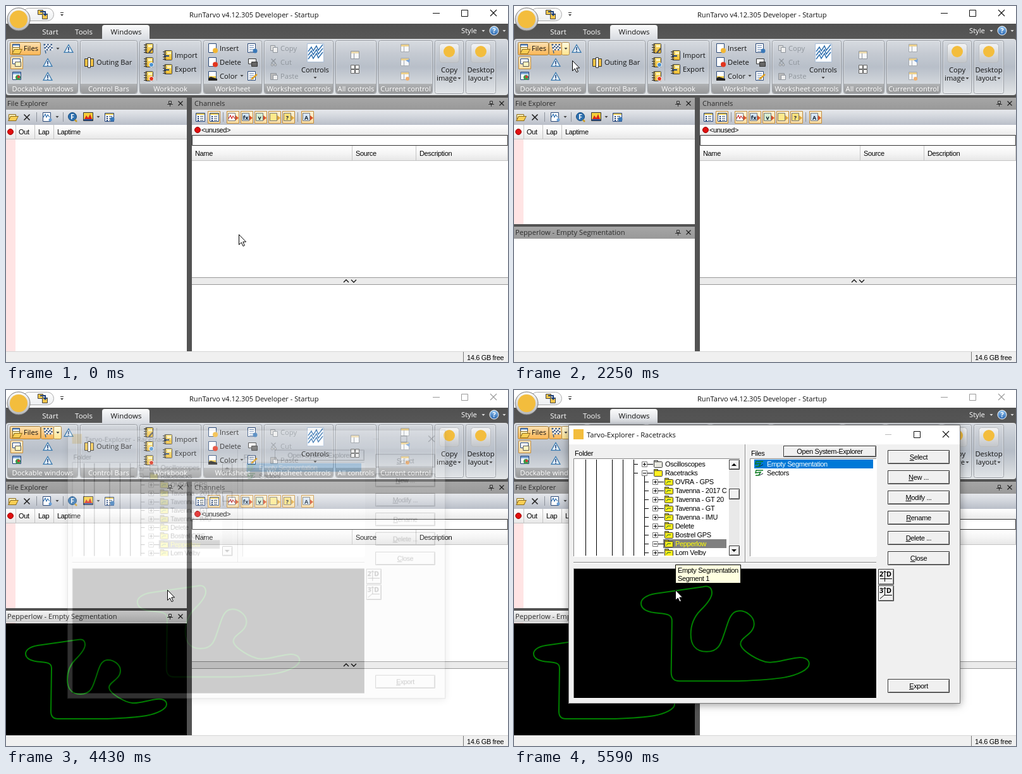
An HTML page with a canvas for the animation above (5670 ms loop, 794 px wide and 563 px high).

```html
<!DOCTYPE html>
<html lang="en">
<head>
<meta charset="utf-8">
<title>Racetrack pane</title>
<style>
html, body { margin: 0; width: 100%; height: 100%; overflow: hidden; background: #fff }
canvas { display: block }
</style>
</head>
<body>
<canvas id="stage" width="794" height="563"></canvas>
<script>
const W = 794, H = 563, LOOP = 5670, STEP = 77.67;
const stage = document.getElementById('stage');
const layer = new OffscreenCanvas(W, H).getContext('2d');
let c = stage.getContext('2d');

const UI = '11.2px "Open Sans", "Noto Sans", sans-serif';
const BOLD = 'bold 10.8px "Open Sans", "Noto Sans", sans-serif';
const SYS = '11px "Liberation Sans", Arial, sans-serif';
const DARK = '#535353', ORANGE = ['#fde3b5', '#fbb450'], YELLOW = ['#fffbe4', '#ffe38c'];
const FACE = '#f0f0f0', NAVY = '#1d3f78', BALL = '#f3bd3d';
const TRACK = new Path2D('M82 520H160C185 519 205 518 222 515C238 512 254 505 254 497C254 490 246 488 238 489' +
  'C222 491 212 496 200 495C188 494 164 480 163 471C162 462 181 458 181 444C181 434 170 426 160 427' +
  'C148 428 146 445 141 458C137 470 134 481 118 481C102 481 97 470 97 458C97 444 102 434 110 426' +
  'C118 418 125 410 125 403C125 396 121 393 113 395L50 404C38 406 31 411 31 417C31 425 40 429 55 430' +
  'C66 431 72 432 72 440L71 508C71 516 74 520 82 520Z');
const ARROW = new Path2D('M.5 .5V16.5L4.3 13L7 18.8L9.4 17.7L6.8 12H11.6Z');

// ---- primitives ----
function paint(fill, y, h) {
  if (!Array.isArray(fill)) return fill;
  const g = c.createLinearGradient(0, y, 0, y + h);
  fill.forEach((col, i) => g.addColorStop(i / (fill.length - 1), col));
  return g;
}
function rect(x, y, w, h, fill, stroke, r = 0) {
  const o = stroke ? .5 : 0;
  c.beginPath();
  c.roundRect(x + o, y + o, w - 2 * o, h - 2 * o, r);
  if (fill) { c.fillStyle = paint(fill, y, h); c.fill(); }
  if (stroke) { c.lineWidth = 1; c.strokeStyle = stroke; c.stroke(); }
}
function line(col, width, ...p) {
  c.beginPath();
  for (let i = 0; i < p.length; i += 2) c.lineTo(p[i], p[i + 1]);
  c.strokeStyle = col; c.lineWidth = width; c.stroke();
}
function poly(col, ...p) {
  c.beginPath();
  for (let i = 0; i < p.length; i += 2) c.lineTo(p[i], p[i + 1]);
  c.closePath(); c.fillStyle = col; c.fill();
}
function dot(x, y, r, fill, stroke) {
  c.beginPath(); c.arc(x, y, r, 0, 7);
  c.fillStyle = paint(fill, y - r, 2 * r); c.fill();
  if (stroke) { c.strokeStyle = stroke; c.lineWidth = 1; c.stroke(); }
}
function text(s, x, y, col = '#111', font = UI, align = 'left') {
  c.font = font; c.fillStyle = col; c.textAlign = align;
  c.letterSpacing = font === SYS ? '-0.35px' : '0px';
  c.fillText(s, x, y);
}
const sys = (s, x, y, col = '#000', align) => text(s, x, y, col, SYS, align);
const drop = (x, y, col = '#444') => poly(col, x - 2.5, y - 1, x + 2.5, y - 1, x, y + 2);
const cross = (x, y, r, col = '#222', w = 1.2) => {
  line(col, w, x - r, y - r, x + r, y + r);
  line(col, w, x + r, y - r, x - r, y + r);
};
function fade(alpha, draw, scale = 1) {
  const main = c;
  c = layer; c.clearRect(0, 0, W, H); draw(); c = main;
  c.save();
  c.globalAlpha = alpha;
  c.translate(396, 275); c.scale(scale, scale);
  c.drawImage(layer.canvas, -396, -275);
  c.restore();
}
function track(s = 1, dx = 0, dy = 0) {
  c.save(); c.translate(dx, dy); c.scale(s, s);
  c.strokeStyle = '#008000'; c.lineWidth = 2 / s; c.stroke(TRACK);
  c.restore();
}

// ---- icons, placed by centre ----
function flag(x, y) {
  line('#33608f', 1.3, x - 6, y - 7, x - 3, y + 8);
  for (let i = 0; i < 5; i++) for (let j = 0; j < 4; j++)
    rect(x - 6 + i * 2.6 + j * .4, y - 7 + j * 2.5 + (i % 2) * .4, 2.6, 2.5, (i + j) % 2 ? '#fff' : '#3f5f8c');
}
function warn(x, y) {
  poly('#3878ae', x, y - 7, x + 8, y + 7, x - 8, y + 7);
  poly('#e4f0f8', x, y - 4.5, x + 5.8, y + 5.8, x - 5.8, y + 5.8);
  rect(x - .8, y - 2, 1.6, 5, NAVY); rect(x - .8, y + 4, 1.6, 1.4, NAVY);
}
function book(x, y, badge) {
  rect(x - 6, y - 8, 13, 16, ['#ffe57a', '#f0b92c'], '#3c3c3c', 1);
  line('#3c3c3c', 1, x - 3.5, y - 8, x - 3.5, y + 8);
  rect(x - 1, y - 5, 6, 3, '#fff4c4');
  for (let i = -6; i < 8; i += 4) rect(x - 8, y + i, 4, 1, '#333');
  if (badge) dot(x + 4, y + 4, 3.5, badge, '#fff');
}
function page(x, y, badge, lines) {
  rect(x - 7, y - 8, 13, 15, '#fff', '#2c4a78');
  if (lines) for (let i = -5; i < 5; i += 3) rect(x - 4, y + i, 7, 1, '#6d8db8');
  if (badge) dot(x + 4, y + 3.5, 4, badge);
}
function win(x, y, col = NAVY, head = '#f5c64a') {
  rect(x - 7, y - 7, 14, 13, '#f6f8fb', col);
  rect(x - 6, y - 6, 12, 3, head);
  line(col, 1, x - 1.5, y - 3, x - 1.5, y + 6);
}
function folder(x, y, w = 15, fill = '#ffdf45') {
  rect(x - w / 2, y - 6, 7, 4, fill, '#333');
  rect(x - w / 2, y - 4, w, 10, fill, '#333', 1);
}
function openFolder(x, y) {
  rect(x - 7, y - 4, 12, 10, '#fff3b8', '#8a6a1c');
  poly('#8a6a1c', x - 4, y - 1, x + 9, y - 1, x + 5, y + 7, x - 8, y + 7);
  poly('#f9cf55', x - 3.3, y, x + 7.6, y, x + 4.3, y + 6, x - 6.5, y + 6);
}
function wave(x, y, col = '#2266aa') {
  line(col, 1.1, x - 5, y + 2, x - 2, y - 3, x, y + 2, x + 2, y - 2, x + 5, y + 2);
}
function pin(x, y, col = '#333') {
  rect(x - 2, y - 4, 5, 5, null, col);
  line(col, 1, x - 4, y + 1.5, x + 5, y + 1.5);
  line(col, 1, x + .5, y + 1.5, x + .5, y + 5);
}
function tree(x, y) {
  rect(x - 7, y - 7, 15, 14, '#fff', NAVY);
  rect(x - 6, y - 6, 13, 2, '#f5c64a');
  for (let i = 0; i < 3; i++) {
    rect(x - 4, y - 2 + i * 3, 2, 2, NAVY);
    rect(x, y - 2 + i * 3, 5, 1, '#456');
  }
}
const mark = (x, y) => rect(x - 10, y - 10, 20, 20, ['#fdf3d8', '#f8dca0'], '#c28b3a');

// ---- main window ----
function titleBar(inactive) {
  rect(0, 0, W, 28, '#fff');
  text('RunTarvo v4.12.305 Developer - Startup', 290, 18, '#111', '11.1px "Open Sans", "Noto Sans", sans-serif');
  const col = inactive ? '#9a9a9a' : '#111';
  line(col, 1, 675, 11.5, 686, 11.5);
  rect(720, 6, 11, 11, null, col);
  cross(771, 11, 5, col, 1.1);
  rect(26, 3, 50, 21, ['#fff', '#eceef0'], '#aaa', 10);
  rect(50, 6, 9, 8, '#f5c64a', '#444'); rect(57, 12, 9, 9, '#f5c64a', '#444');
  line(NAVY, 2, 54, 9, 62, 9, 62, 13); poly(NAVY, 58, 12, 66, 12, 62, 16);
  line('#333', 1, 86, 10.5, 91, 10.5); drop(88.5, 14);
}
function tabs(k) {
  rect(0, 28, W, 24, ['#505050', '#575757']);
  if (k >= 7 && k <= 9) rect(98, 30, 50, 22, ['#8c8c8c', '#666'], '#9a9a9a', 3);
  rect(152, 30, 75, 24, ['#fafbfb', '#e8eaed', '#d6dae0'], null, [4, 4, 0, 0]);
  const f = '11.5px "Open Sans", "Noto Sans", sans-serif';
  text('Start', 70, 45, '#fff', f, 'center');
  text('Tools', 123, 45, '#fff', f, 'center');
  text('Windows', 190, 45, '#111', f, 'center');
  text('Style', 720, 43, '#fff');
  drop(755, 39, '#ddd'); drop(788, 39, '#ddd');
  dot(772, 39, 7, ['#8fc3f0', '#2a66b0'], '#fff');
  text('?', 772, 43, '#fff', BOLD, 'center');
  dot(20, 21, 18, ['#fdfdfd', '#b4b7bb'], '#777');
  dot(20, 21, 14, BALL);
}
const GROUPS = [[2, 112, 'Dockable windows'], [117, 91, 'Control Bars'], [211, 98, 'Workbook'],
  [312, 93, 'Worksheet'], [408, 110, 'Worksheet controls'], [521, 65, 'All controls'],
  [589, 86, 'Current control'], [678, 46], [727, 48]];
function ribbon(k) {
  rect(0, 52, W, 93, DARK);
  rect(0, 52, W, 89, ['#d6dae0', '#c3c9d1', '#b6bdc7', '#cbd0d6', '#e2e5e7'], '#e6e8ea', 3);
  GROUPS.forEach(([x, w, name], i) => {
    const hot = !i && k >= 10 && k < 29;
    rect(x, 54, w, 85, hot ? ['#eef1f4', '#e6e9ed', '#e9ecef', '#f3f5f6', '#fafafa']
      : ['#d8dce1', '#c5cad2', '#b8bfc9', '#cdd2d8', '#e2e5e8'], '#9a9ea4', 3);
    rect(x + 1, 55, w - 2, 83, null, 'rgba(255,255,255,.35)', 2);
    if (!name) return;
    rect(x + 1, 123, w - 2, 15, hot ? ['#8d8d8d', '#757575'] : ['#b0b2b4', '#979899'], null, [0, 0, 3, 3]);
    text(name, x + w / 2, 135, '#fff', UI, 'center');
  });
  rect(6, 57, 49, 21, ORANGE, '#a67f3c', 2);
  rect(10, 60, 12, 8, '#fff', NAVY); rect(11, 61, 10, 2, '#7ea6d4'); openFolder(17, 69);
  text('Files', 28, 71);
  if (k >= 11) {
    const on = k >= 14;
    rect(55, 57, 21, 21, on ? ORANGE : YELLOW, '#b08a4a', 2);
    rect(75, 57, 13, 21, on && k < 29 ? ['#fbb450', '#f59a30'] : YELLOW, '#b08a4a', 2);
  }
  flag(66, 67); drop(82, 67);
  warn(99, 67); warn(66, 89); warn(66, 111);
  mark(17, 90); rect(10, 83, 13, 9, '#fff', NAVY); rect(14, 88, 10, 8, '#fff6c0', '#555');
  rect(10, 104, 14, 13, '#fff', NAVY); rect(11, 105, 12, 3, '#7ea6d4'); dot(19, 113, 4, '#3d9a4a'); dot(20, 112, 2, '#d33');

  rect(124, 83, 15, 13, '#f3c345', '#333'); rect(129, 81, 5, 17, '#fff', '#333');
  text('Outing Bar', 143, 93);
  book(226, 67); line('#555', 2.5, 226, 74, 232, 67);
  book(226, 89, '#4a90d0'); book(226, 111, '#e2341d');
  line('#a9adb3', 1, 238.5, 60, 238.5, 118);
  for (const [name, y] of [['Import', 78], ['Export', 100]]) {
    book(256, y); line(NAVY, 2, 251, y + 1, 258, y + 1); text(name, 267, y + 4);
  }
  page(327, 67, '#f2b632'); page(327, 89, '#e2341d');
  page(327, 111); rect(321, 111, 11, 3, '#f6d04c'); poly('#222', 320, 118, 320, 114, 324, 112, 334, 115, 334, 118);
  ['Insert', 'Delete', 'Color'].forEach((s, i) => text(s, 338, 71 + 22 * i));
  drop(373, 110);
  page(389, 67, null, 1); dot(394, 71, 3.5, '#3a78b8');
  rect(383, 83, 13, 9, '#fff', '#333'); rect(388, 88, 10, 8, '#666', '#333');
  page(389, 111, null, 1); line('#e0a020', 2.5, 388, 116, 397, 108);

  const grey = '#8f959c';
  rect(418, 62, 8, 9, '#ddd', grey); rect(422, 65, 8, 9, '#eee', grey);
  cross(423, 87, 3.5, grey); dot(421, 93, 1.8, '#ccc', grey); dot(426, 93, 1.8, '#ccc', grey);
  rect(418, 106, 10, 11, '#bbb', grey); rect(422, 109, 8, 8, '#eee', grey);
  ['Copy', 'Cut', 'Paste'].forEach((s, i) => text(s, 434, 71 + 22 * i, grey));
  rect(476, 59, 27, 30, '#fff', '#a9bdd6');
  for (let i = 0; i < 3; i++)
    line('#2f6fae', 1.5, 478, 72 + i * 6, 483, 65 + i * 6, 486, 71 + i * 6, 491, 63 + i * 6, 494, 70 + i * 6, 501, 61 + i * 6);
  text('Controls', 489, 105, '#111', UI, 'center'); drop(489, 113);
  win(552, 78, '#8f959c', '#ead9ae');
  for (let i = 0; i < 4; i++) rect(545 + i % 2 * 7, 93 + (i >> 1) * 7, 7, 7, '#eee', '#666');
  for (let i = 0; i < 3; i++) win(631, 67 + 22 * i, '#a3a8ae', '#ecd08c');
  poly('#7da5d8', 632, 86, 639, 84, 638, 90); dot(635, 115, 3, '#f0b070');
  for (const [x, a, b] of [[701, 'Copy', 'image'], [751, 'Desktop', 'layout']]) {
    rect(x - 16, 59, 32, 31, ['#f4f5f6', '#c2c5c9'], '#b9bcc0', 4);
    dot(x, 72, 9, BALL);
    text(a, x, 105, '#111', UI, 'center');
    text(b, x - 4, 118, '#111', UI, 'center');
    drop(x + 16, 114);
  }
}
function header(name, x, y, w, active) {
  rect(x, y, w, 19, active ? ['#f6f6f6', '#cdcdcd'] : ['#a6a6a6', '#999']);
  text(name, x + (x ? 4 : 2), y + 13, '#2b2b2b');
  pin(x + w - 27, y + 9); cross(x + w - 10, y + 9, 3.5);
}
function columns(y, h, x, w, cols) {
  rect(x, y, w, h, ['#fff', '#f5f5f5', '#e6e6e6']);
  line('#c4c4c4', 1, x, y + h - .5, x + w, y + h - .5);
  for (const [name, tx, sep] of cols) {
    sys(name, tx, Math.floor(y + h / 2 + 4));
    if (sep) line('#c4c4c4', 1, sep + .5, y, sep + .5, y + h);
  }
}
const bar = x => line('#8d929b', 1, x + .5, 168, x + .5, 183);
function panes(k) {
  rect(0, 141, W, 406, DARK);
  rect(0, 188, 286, 359, '#fff');
  rect(294, 188, 500, 359, '#fff');
  header('File Explorer', 0, 145, 286);
  header('Channels', 294, 145, 500);
  for (const [x, w] of [[0, 286], [294, 500]]) rect(x, 164, w, 24, ['#e6e8ec', '#d0d4db', '#b9bec8']);

  openFolder(11, 175); cross(33, 176, 4.5, '#222', 1.6); bar(48);
  page(65, 176); wave(64, 174); dot(70, 180, 2.5, '#6aa0d8'); drop(81, 175); bar(90);
  dot(105, 175, 6.5, '#2c6fae', '#174a7c'); text('F', 105, 179, '#fff', BOLD, 'center');
  line('#c99b28', 2.5, 109, 180, 112, 183);
  rect(122, 168, 16, 14, '#f5cf3a', '#333'); poly('#d8271b', 123, 181, 127, 173, 130, 177, 133, 171, 137, 181);
  rect(123, 179, 14, 2, '#2452a0'); drop(146, 175); tree(163, 176); dot(168, 179, 3.5, '#3a78b8');

  tree(307, 176); mark(329, 176); tree(329, 176); bar(343);
  ['~', 'fx', 'v', '', '?', 'A'].forEach((s, i) => {
    const x = i < 5 ? 359 + 22 * i : 477;
    mark(x, 176);
    const col = ['#fff', '#cfe2f4', '#d6ecd0', '#ffe98c', '#ffe07a', '#d5e4f5'][i];
    rect(x - 8, 169, 12, 13, col, '#777');
    poly(i === 3 || i === 4 ? '#e0a83a' : '#d9532a', x + 4, 173, x + 9, 177, x + 4, 181);
    if (s === '~') wave(x - 2, 176, '#c22');
    else text(s, x - 2, 180, '#123', 'bold 9px "Open Sans", "Noto Sans", sans-serif', 'center');
  });
  bar(461);

  columns(188, 23, 0, 286, [['', 0, 15], ['Out', 20, 45], ['Lap', 51, 75], ['Laptime', 81]]);
  dot(7, 199, 4.5, '#e01010', '#900');
  rect(0, 211, 15, 336, '#ffe4e4');
  rect(294, 188, 500, 17, ['#fff', '#e9e9e9']);
  dot(303, 196, 4.5, '#e01010', '#900'); sys('<unused>', 309, 200);
  rect(294, 204, 500, 17, '#fff', '#333');
  columns(221, 24, 294, 500, [['Name', 299, 547], ['Source', 553, 648], ['Description', 654, 793]]);
  rect(294, 429, 500, 12, '#ebebeb'); line('#999', 1, 294, 429.5, W, 429.5); line('#999', 1, 294, 440.5, W, 440.5);
  line('#111', 1.3, 534, 437, 538, 433, 542, 437); line('#111', 1.3, 546, 433, 550, 437, 554, 433);

  if (k >= 29) {
    rect(0, 345, 286, 4, DARK);
    header('Pepperlow - Empty Segmentation', 0, 349, 286, k >= 40);
  }
  if (k >= 29 && k < 31) rect(0, 368, 286, 178, '#fff');
  if (k >= 31) { rect(0, 369, 286, 177, '#000'); track(); }
  rect(0, 546, W, 17, FACE); line('#d5d5d5', 1, 0, 546.5, W, 546.5);
  line('#777', 1, 723.5, 547, 723.5, H);
  sys('14.6 GB free', 729, 560);
}

// ---- popups ----
function tip() {
  rect(58, 148, 210, 39, 'rgba(0,0,0,.4)', null, 2);
  rect(55, 145, 211, 40, ['#ececec', '#cfcfd3'], '#767676', 2);
  flag(69, 155);
  text('Show racetrack pane', 83, 159, '#444', BOLD);
  text('Shows the racetrack window.', 83, 178, '#444');
}
const glow = (x, y, w, h) => rect(x, y, w, h, ['#fffbe0', '#ffe59a', '#ffd34e', '#ffe48c'], '#e0b850', 2);
function dropMenu(hot) {
  rect(58, 82, 224, 109, 'rgba(0,0,0,.35)');
  rect(55, 79, 225, 110, '#fafafa', '#868686');
  rect(56, 80, 25, 108, '#e9eaec');
  rect(56, 146, 223, 18, '#ebebeb'); line('#c8c8c8', 1, 56, 163.5, 279, 163.5);
  if (hot) glow(57, 80, 221, 22);
  rect(59, 125, 20, 20, ORANGE, '#c28b3a');
  ['Dockable window', 'Transparent window', 'Hidden'].forEach((s, i) => {
    flag(69, 91 + 22 * i); text(s, 87, 95 + 22 * i, '#333');
  });
  dot(73, 139, 3, '#e58a1f');
  text('Transparent window', 60, 159, '#333', BOLD);
  rect(62, 170, 14, 13, '#eee', '#bbb'); line('#aaa', 1, 65, 179, 67, 175, 72, 174, 73, 177, 65, 179);
  text('Show window frame temporarily', 87, 180, '#a3a3a3');
}
const ITEMS = [[103, 'Zoom undo', 'Ctrl+Z'], [124, 'Show All', 'A'], [153, 'Use GPS, if available', '', 1],
  [174, '3D view', 'Ctrl+3'], [195, '2D view', 'Ctrl+2', 1], [224, 'Car shape', '>'], [245, 'Options', '>'],
  [266, '2D Options', '>'], [295, 'New racetrack ...', ''], [316, 'Load racetrack', 'F6'],
  [337, 'Edit racetrack', 'F5'], [358, 'Save racetrack', 'F7'], [387, 'Save as text file', '']];
function contextMenu(hotY) {
  rect(190, 93, 176, 309, 'rgba(0,0,0,.35)');
  rect(187, 90, 176, 310, '#fafafa', '#868686');
  rect(188, 91, 26, 308, '#e9eaec');
  for (const y of [138.5, 209.5, 280.5, 372.5]) line('#c5c5c5', 1, 219, y, 361, y);
  for (const [y, name, key, on] of ITEMS) {
    if (Math.abs(hotY - y) < 10.5) glow(189, y - 11, 172, 22);
    const col = y === 103 ? '#a3a3a3' : '#333';
    text(name, 219, y + 4, col);
    if (key === '>') poly('#333', 353, y - 5, 357, y - 1, 353, y + 3);
    else text(key, 349, y + 4, col, UI, 'right');
    if (on) {
      rect(191, y - 10, 20, 20, ['#ffe9b0', '#ffd27a'], '#e0a03c');
      line(NAVY, 1.8, 197, y, 200, y + 4, 205, y - 5);
    }
  }
}
function button(x, y, w, h, label) {
  rect(x, y, w, h, FACE, '#333');
  line('#fff', 1, x + 1.5, y + h - 2, x + 1.5, y + 1.5, x + w - 2, y + 1.5);
  line('#888', 1, x + 2, y + h - 1.5, x + w - 1.5, y + h - 1.5, x + w - 1.5, y + 2);
  if (label) sys(label, x + w / 2, y + h / 2 + 4, '#000', 'center');
}
function sunken(x, y, w, h, fill) {
  rect(x, y, w, h, fill, '#888');
  line('#fff', 1, x, y + h - .5, x + w - .5, y + h - .5, x + w - .5, y);
}
function fileIcon(x, y) {
  line('#0b7a1e', 1.5, x + 6, y - 4, x - 5, y - 4, x - 6, y, x + 2, y - 1, x - 1, y + 4, x - 6, y + 4);
  line('#123', 1, x, y + 4, x + 6, y + 1);
}
function folderTree() {
  sunken(94, 108, 264, 156, '#fff');
  c.save();
  c.beginPath(); c.rect(96, 110, 240, 152); c.clip();
  for (const x of [113, 130, 155, 172, 189, 206]) line('#000', 1, x + .5, x === 206 ? 131 : 110, x + .5, 262);
  ['Oscilloscopes', 'Racetracks', 'OVRA - GPS', 'Tavenna - 2017 C', 'Tavenna - GT 20', 'Tavenna - GT',
    'Tavenna - IMU', 'Delete', 'Bostrel GPS', 'Pepperlow', 'Lorn Velby'].forEach((name, i) => {
    const y = 117 + 14 * i, x = i < 2 ? 206 : 223, chosen = i === 9;
    line('#000', 1, x - 17, y + .5, x - 10, y + .5);
    if (chosen) rect(236, y - 7, 100, 14, '#808080');
    line('#000', 1, x, y + .5, x + 14, y + .5);
    rect(x - 4, y - 4, 9, 9, '#fff', '#777');
    line('#000', 1, x - 2, y + .5, x + 3, y + .5);
    if (i !== 1 && !chosen) line('#000', 1, x + .5, y - 2, x + .5, y + 3);
    folder(x + 22, y, 14, i ? '#ffee20' : '#e8e8e0');
    if (i > 1) line('#0a6a1a', 1, x + 18, y + 3, x + 20, y, x + 25, y);
    sys(name, x + (i < 2 ? 33 : 32), y + 4, chosen ? '#ffff00' : '#000');
  });
  c.restore();
  rect(340, 110, 17, 152, '#e9e9e9');
  button(340, 110, 17, 16); button(340, 156, 17, 17); button(340, 246, 17, 16);
  poly('#000', 344, 120, 352, 120, 348, 116); poly('#000', 344, 252, 352, 252, 348, 256);
}
function dialog() {
  c.save();
  c.shadowColor = 'rgba(0,0,0,.4)'; c.shadowBlur = 12; c.shadowOffsetY = 2;
  rect(86, 55, 620, 441, FACE);
  c.restore();
  rect(86, 55, 620, 441, FACE, '#777');
  rect(87, 56, 618, 30, '#fff');
  rect(94, 62, 16, 16, BALL);
  text('Tarvo-Explorer - Racetracks', 115, 75);
  line('#bbb', 1, 587, 70.5, 597, 70.5); rect(632, 65, 11, 11, null, '#111'); cross(683, 70, 5, '#111', 1.1);
  sys('Folder', 96, 104); sys('Files', 375, 104);
  folderTree();
  line('#888', 1, 365.5, 86, 365.5, 272); line('#fff', 1, 366.5, 86, 366.5, 272);
  line('#888', 1, 94, 272.5, 573, 272.5); line('#fff', 1, 94, 273.5, 573, 273.5);
  sunken(373, 108, 201, 156, '#fff');
  rect(380, 110, 188, 14, '#0078d7');
  fileIcon(388, 117); fileIcon(388, 131);
  sys('Empty Segmentation', 400, 121, '#fff'); sys('Sectors', 400, 135);
  button(426, 88, 147, 18, 'Open System-Explorer');
  sunken(94, 282, 480, 206, '#000');
  track(1.192, 164, -159.5);
  ['Select', 'New ...', 'Modify ...', 'Rename', 'Delete ...', 'Close', 'Export'].forEach((s, i) => {
    const y = i < 6 ? 95 + 32 * i : 457;
    button(591, y, 98, 22, s);
    const left = 640 - c.measureText(s).width / 2;
    line('#000', 1, left, y + 16.5, left + c.measureText(s[0]).width, y + 16.5);
  });
  ['2', '3'].forEach((n, i) => {
    const y = 283 + 26 * i;
    button(576, y, 25, 25);
    text(n, 578, y + 12, '#000', BOLD); text('D', 589, y + 12, '#000', BOLD);
    line('#000', 1, 586.5, y + 3, 586.5, y + 15 + 5 * !i);
    line('#000', 1, 584, y + 6, 586.5, y + 3, 589, y + 6);
    line('#000', 1, i ? 586 : 579, y + 15.5, 598, y + 15.5);
    if (i) line('#000', 1, 586, y + 15, 579, y + 21);
  });
}
function hint() {
  rect(255, 276, 104, 30, '#ffffe1', '#000');
  sys('Empty Segmentation', 259, 289); sys('Segment 1', 259, 302);
}

// ---- pointer: [step, x, y] ----
const MOVES = [[0, 368, 361], [1, 355, 340], [4, 225, 160], [6, 140, 70], [8, 112, 38], [9, 98, 50], [10, 88, 62],
  [11, 83, 66], [18, 83, 66], [21, 89, 80], [24, 92, 86], [30, 92, 86], [31, 100, 110], [33, 150, 310],
  [35, 173, 390], [38, 187, 393], [44, 187, 393], [45, 196, 399], [46, 220, 372], [47, 238, 330],
  [48, 244, 316], [49, 246, 309], [51, 246, 309], [53, 255, 316], [99, 255, 316]];
function pointerAt(k) {
  const i = MOVES.findIndex(m => m[0] > k);
  const [a, x, y] = MOVES[i - 1], [b, u, v] = MOVES[i], f = (k - a) / (b - a);
  return [Math.round(x + (u - x) * f), Math.round(y + (v - y) * f)];
}
function pointer(x, y, busy) {
  if (busy) {
    c.beginPath(); c.arc(x, y, 9.5, 0, 7); c.lineWidth = 4; c.strokeStyle = '#1b7fd6'; c.stroke();
    c.beginPath(); c.arc(x, y, 9.5, -1.6, .2); c.strokeStyle = '#8fd0ff'; c.stroke();
    return;
  }
  c.save(); c.translate(x, y);
  c.fillStyle = '#fff'; c.fill(ARROW);
  c.strokeStyle = '#000'; c.lineWidth = 1; c.stroke(ARROW);
  c.restore();
}

function draw(k) {
  const [x, y] = pointerAt(k);
  c.clearRect(0, 0, W, H);
  titleBar(k >= 57); ribbon(k); tabs(k); panes(k);
  if (k >= 12 && k < 15) fade(k === 12 ? .5 : 1, tip);
  if (k >= 15 && k < 28) fade(k === 15 ? .6 : k === 27 ? .5 : 1, () => dropMenu(k >= 20));
  if (k >= 40 && k < 57) fade([.35, .7][k - 40] ?? 1, () => contextMenu(k >= 45 ? y : 0));
  if (k >= 57) fade([.2, .44, .65, .88][k - 57] ?? 1, dialog, [.965, .975, .983, .994][k - 57] ?? 1);
  if (k >= 72) hint();
  pointer(x, y, k >= 55 && k < 57);
}

let shown = -1;
const start = performance.now();
function tick(now) {
  const t = Math.max(0, now - start) % LOOP;
  const k = Math.min(72, Math.floor((t + 24) / STEP));
  if (k !== shown) draw(shown = k);
  requestAnimationFrame(tick);
}
draw(0);
requestAnimationFrame(tick);
</script>
</body>
</html>
```
